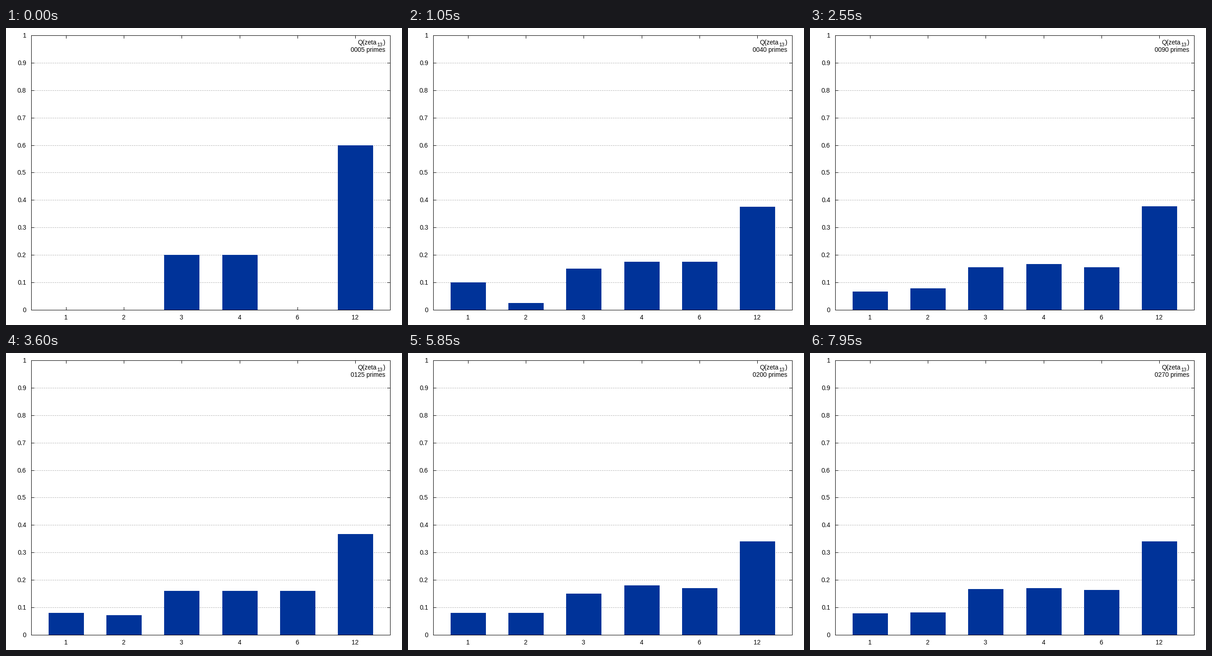
These frames come from a looping animation (864 px wide and 648 px high, 8 s). A matplotlib script:

```python
import itertools
import math

import matplotlib.pyplot as plt
from matplotlib.animation import FuncAnimation
from matplotlib.patches import Rectangle

WIDTH, HEIGHT, DPI = 864, 648, 100
LEFT, RIGHT, TOP, BOTTOM = 55, 838, 16, 615
MODULUS = 13
ORDERS = [1, 2, 3, 4, 6, 12]
INTERVAL, DURATION = 50, 8000
FRAMES_PER_STEP, PRIMES_PER_STEP = 3, 5
FONT_PX = 13.75
TICK = 6
BAR_WIDTH = 0.6
BLUE, GREY = "#003399", "#a0a0a0"


def order(n):
    """Multiplicative order of n modulo MODULUS."""
    return next(k for k in itertools.count(1) if pow(n, k, MODULUS) == 1)


def unramified_primes():
    for n in itertools.count(2):
        if n != MODULUS and all(n % d for d in range(2, math.isqrt(n) + 1)):
            yield n


def column(x):
    """Pixel column of a category coordinate, the axis running from 0.4 to 6.6."""
    return math.floor(LEFT + (x - 0.4) / 6.2 * (RIGHT - LEFT) + 0.5)


def row(value):
    """Pixel row of a value between 0 and 1."""
    return BOTTOM - math.floor(value * (BOTTOM - TOP) + 0.5 + 1e-9)


frame_count = DURATION // INTERVAL
step_count = -(-frame_count // FRAMES_PER_STEP)
prime_orders = [order(p) for p in
                itertools.islice(unramified_primes(), step_count * PRIMES_PER_STEP)]

fig = plt.figure(figsize=(WIDTH / DPI, HEIGHT / DPI), dpi=DPI, facecolor="white")
ax = fig.add_axes([0, 0, 1, 1])
ax.set_xlim(0, WIDTH)
ax.set_ylim(HEIGHT, 0)
ax.axis("off")


def box(x, y, w, h, color="black", z=2):
    return ax.add_patch(Rectangle((x, y), w, h, fc=color, lw=0, zorder=z,
                                  antialiased=False, snap=False))


def label(x, y, text, ha="left", scale=1.0):
    return ax.text(x, y, text, ha=ha, va="baseline", color="black", zorder=5,
                   family="Liberation Sans", size=FONT_PX * scale * 72 / DPI)


# Grid, ticks and axis labels
for i in range(11):
    y = row(i / 10)
    if 0 < i < 10:
        ax.plot([LEFT, RIGHT], [y + 0.5] * 2, color=GREY, lw=72 / DPI,
                ls=(0, (2, 2)), dash_capstyle="butt", snap=False, zorder=1)
    box(LEFT, y, TICK + 1, 1)
    box(RIGHT - TICK, y, TICK + 1, 1)
    label(44, y + 5, f"{i / 10:g}", "right")

bars = []
for i, name in enumerate(ORDERS, 1):
    x = column(i)
    box(x, TOP, 1, TICK + 1)
    box(x, BOTTOM - TICK, 1, TICK + 1)
    label(x - 0.6, 636, str(name), "center")
    x0, x1 = column(i - BAR_WIDTH / 2), column(i + BAR_WIDTH / 2)
    bars.append(box(x0, BOTTOM, x1 - x0 + 1, 0, BLUE, 3))

# Frame, in front of the bars
for y in (TOP, BOTTOM):
    box(LEFT, y, RIGHT - LEFT + 1, 1, z=4)
for x in (LEFT, RIGHT):
    box(x, TOP, 1, BOTTOM - TOP + 1, z=4)

# Key
label(767.4, 36, "Q(zeta")
label(809.6, 40, str(MODULUS), scale=0.8)
label(823, 36, ")")
counter = label(752, 52, "")


def update(frame):
    total = (frame // FRAMES_PER_STEP + 1) * PRIMES_PER_STEP
    seen = prime_orders[:total]
    for bar, name in zip(bars, ORDERS):
        y = row(seen.count(name) / total)
        bar.set_y(y)
        bar.set_height(BOTTOM - y)
    counter.set_text(f"{total:04d} primes")
    return [*bars, counter]


anim = FuncAnimation(fig, update, frames=frame_count, interval=INTERVAL,
                     repeat=True, repeat_delay=0, blit=False)
plt.show()
```
